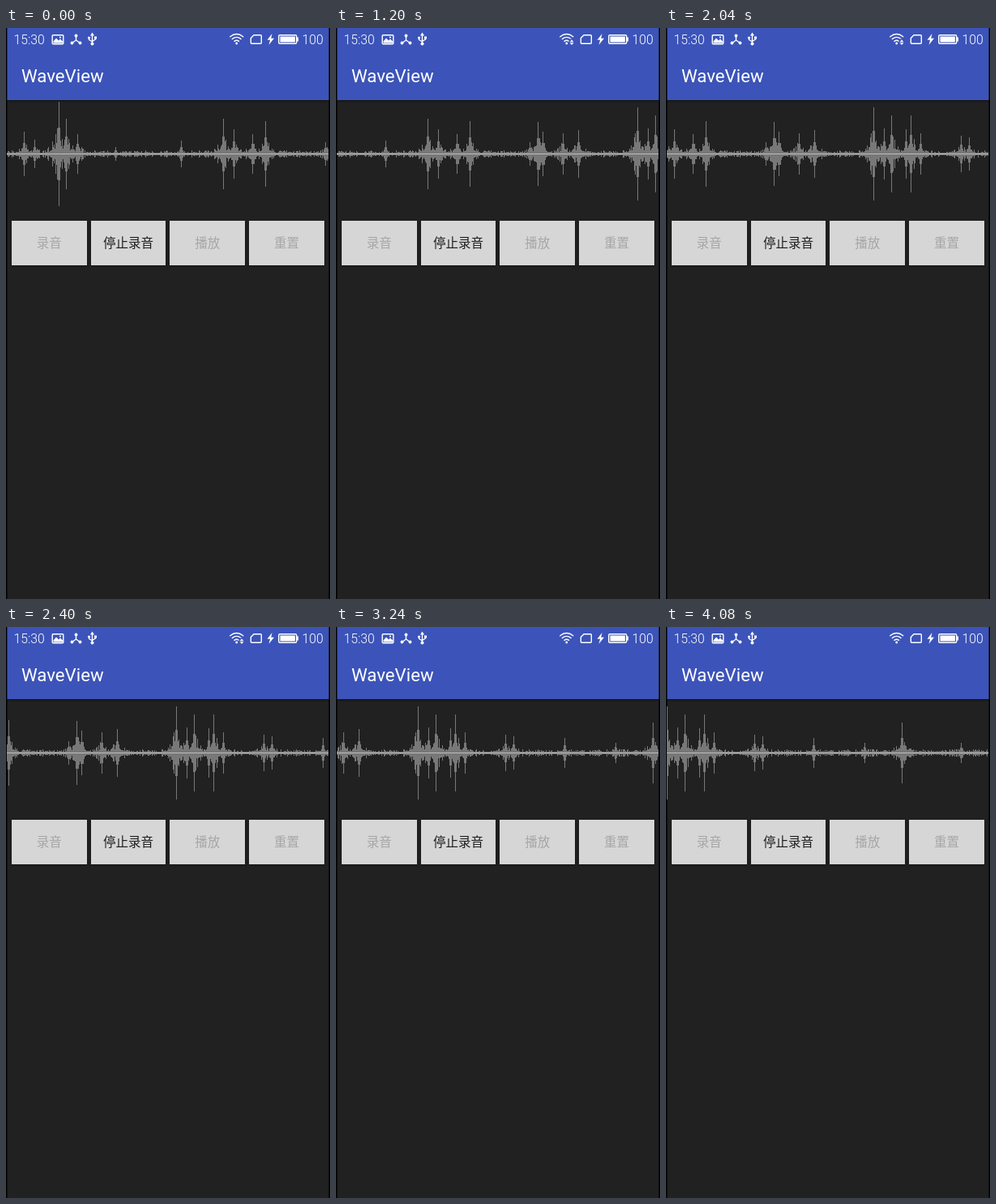
Recreate the animation shown at these times as an HTML page with a canvas. Size 400 by 705 pixels, loop 4200 ms.

```html
<!DOCTYPE html>
<html lang="zh">
<head>
<meta charset="utf-8">
<title>WaveView</title>
<style>
  html, body { margin: 0; width: 100%; height: 100%; overflow: hidden; background: #000; }
  #stage { position: relative; width: 400px; height: 705px; overflow: hidden; }
  svg, canvas { position: absolute; left: 0; top: 0; display: block; }
  .latin { font-family: Roboto, sans-serif; fill: #fff; }
  .status { font-size: 15.7px; font-weight: 300; }
  .label { font: 15.5px "Noto Sans CJK SC", "Noto Sans CJK", sans-serif; text-anchor: middle; fill: #a6a6a6; }
  .label .active { fill: #1c1c1c; }
  .buttons { fill: #d6d6d6; filter: drop-shadow(0 1px 1.5px rgba(0, 0, 0, .4)); }
  .line { fill: none; stroke: #fff; stroke-width: 1.4; stroke-linecap: round; stroke-linejoin: round; }
  .solid { fill: #fff; }
  .bar { fill: #3c54b9; }
  .traffic { animation: traffic 4200ms step-end infinite; }
  @keyframes traffic { 0% { opacity: 0; } 8.5714% { opacity: 1; } 60% { opacity: 0; } }
</style>
</head>
<body>
<div id="stage">
  <svg width="400" height="705" viewBox="0 0 400 705">
    <defs>
      <linearGradient id="shade" x2="0" y2="1">
        <stop stop-opacity=".35"/>
        <stop offset="1" stop-opacity="0"/>
      </linearGradient>
    </defs>
    <rect x="1.5" width="397" height="705" fill="#212121"/>
    <rect class="bar" x="1.5" width="397" height="89"/>
    <rect x="1.5" y="89" width="397" height="4" fill="url(#shade)"/>

    <g class="latin">
      <text class="status" x="9.5" y="19.5">15:30</text>
      <text class="status" x="365.5" y="19.5">100</text>
      <text x="19" y="67" font-size="22.2">WaveView</text>
    </g>

    <!-- picture -->
    <rect class="line" x="57.2" y="8.7" width="13.6" height="11" rx="1"/>
    <path class="solid" d="M58.5 18.5v-2l3.5-4 3 3 2-2 3 3v2z"/>
    <circle class="solid" cx="67" cy="11.6" r="1.1"/>
    <!-- nodes -->
    <path class="line" d="M86.5 10v5l-4.5 3.3M86.5 15l4.5 3.3"/>
    <g class="solid">
      <circle cx="86.5" cy="9.5" r="1.9"/>
      <circle cx="81.5" cy="18.5" r="1.9"/>
      <circle cx="91.5" cy="18.5" r="1.9"/>
    </g>
    <!-- usb -->
    <path class="line" d="M106.5 9v10M102.5 12v2.5l4 2.5M110.5 12v2l-4 2.5"/>
    <path class="solid" d="M106.5 5.5l2.5 4h-5z"/>
    <circle class="solid" cx="106.5" cy="19.5" r="2"/>
    <circle class="solid" cx="102.5" cy="12" r="1.5"/>
    <rect class="solid" x="109" y="10.5" width="3" height="3"/>
    <!-- wifi -->
    <path class="line" d="M276.7 10.8q8-6.6 16 0M279.3 13.6q5.4-4.4 10.8 0M281.9 16.4q2.8-2.2 5.6 0"/>
    <circle class="solid" cx="284.7" cy="19" r="1.4"/>
    <g class="traffic">
      <path class="bar" d="M287.5 13.5h7v8h-7z"/>
      <path class="solid" d="M291 14.5l2.5 2.8h-5zM288.5 18.2h5l-2.5 2.8z"/>
    </g>
    <!-- sim -->
    <path class="line" d="M306 8.7h8.3q1 0 1 1v8.6q0 1-1 1h-11q-1 0-1-1v-5.8z"/>
    <!-- charge -->
    <path class="solid" d="M328.5 7l-6 7.800h3.600l-1.600 6 6.500-8h-3.800z"/>
    <!-- battery -->
    <rect class="line" x="336.7" y="8.7" width="22" height="10.6" rx="1.5"/>
    <rect class="solid" x="338.5" y="10.5" width="18.4" height="7"/>
    <rect class="solid" x="359" y="11.5" width="2" height="5"/>

    <g class="buttons">
      <rect x="7" y="238" width="93" height="55"/>
      <rect x="105" y="238" width="92" height="55"/>
      <rect x="202" y="238" width="93" height="55"/>
      <rect x="300" y="238" width="93" height="55"/>
    </g>
    <g class="label">
      <text x="53.3" y="271">录音</text>
      <text class="active" x="151" y="271">停止录音</text>
      <text x="248.8" y="271">播放</text>
      <text x="346.6" y="271">重置</text>
    </g>
  </svg>
  <canvas id="wave" width="400" height="240"></canvas>
</div>
<script>
const LOOP = 4200, STEP = 120, MID = 155;
const ctx = document.getElementById('wave').getContext('2d');

const scroll = [[0, 0], [1560, 201.5], [2040, 270.5], [3240, 425.5], [LOOP, 540]];

// position and height of the main sounds
const sounds = [[22, 27], [35, 17], [65, 64], [74, 43], [88, 24], [135, 8], [216, 16],
  [268, 43], [281, 30], [304, 24], [320, 40], [394, 14], [404, 39], [410, 27], [435, 25],
  [454, 29], [527, 57], [540, 31], [549, 47], [567, 30], [573, 47], [585, 25],
  [635, 22], [645, 20], [708, 18], [771, 12], [817, 37], [890, 12]];

function distance(time) {
  const i = scroll.findIndex(([t]) => t > time);
  const [t0, d0] = scroll[i - 1], [t1, d1] = scroll[i];
  return d0 + (d1 - d0) * (time - t0) / (t1 - t0);
}

function random(seed) {
  const v = Math.sin(seed * 12.9898 + 4.1) * 43758.5453;
  return v - Math.floor(v);
}

// each sound is a sharp peak on a wider, ragged skirt
function barHeight(x) {
  let peak = 0, skirt = 0;
  for (const [center, height] of sounds) {
    const d = Math.abs(x - center);
    peak = Math.max(peak, height * Math.exp(-d * 0.7));
    skirt = Math.max(skirt, height * 0.65 * Math.exp(-d / 8));
  }
  const r = random(x);
  return Math.max(peak, skirt * (0.25 + 0.75 * r * r), 1 + 3 * r * r);
}

const bars = Array.from({ length: 950 }, (_, x) => Math.round(barHeight(x)));

function draw(time) {
  const start = Math.round(distance(time));
  ctx.clearRect(0, 0, 400, 240);
  ctx.fillStyle = '#787878';
  for (let x = 1; x < 398; x++) {
    const h = bars[x + start];
    ctx.fillRect(x, MID - h, 1, h * 2 + 1);
  }
  ctx.fillStyle = '#bdbdbd';
  ctx.fillRect(1, MID, 397, 1);
}

function tick() {
  const time = performance.now() % LOOP;
  draw(Math.floor(time / STEP) * STEP);
  requestAnimationFrame(tick);
}
tick();
</script>
</body>
</html>
```
